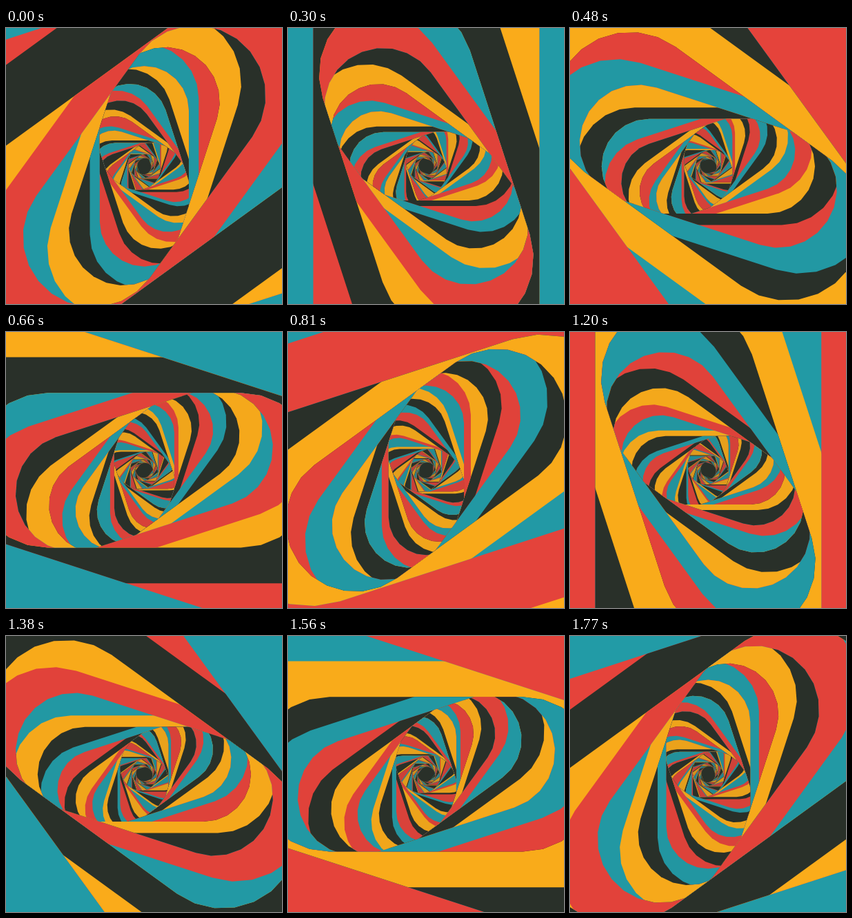
An HTML page with a canvas that plays this animation: 400 px wide and 400 px high, repeating every 1800 ms.

```html
<!DOCTYPE html>
<html lang="en">
<head>
<meta charset="utf-8">
<title>Twisting tunnel</title>
<style>
  html, body { margin: 0; width: 100%; height: 100%; overflow: hidden; background: #293029; }
  canvas { display: block; width: 400px; height: 400px; }
</style>
</head>
<body>
<canvas id="stage" width="400" height="400"></canvas>
<script>
const ctx = document.getElementById('stage').getContext('2d');

const LOOP = 1800, STEP = 30, PER_RING = 90;
const CENTER = 200.4, REACH = 600;
const FOCAL = 355;          // half width of the tunnel at depth 1
const STRETCH = 2.25;       // length to width of the cross-section
const SEGMENTS = 12;        // facets of each rounded end
const TWIST = -Math.PI / 10;
const DEPTH_SHIFT = 0.5;
const FAR = 36, FOG = 0.01;

const DARK = [41, 48, 41];
const COLORS = [DARK, [232, 67, 59], [255, 174, 26], [34, 156, 168]];

const angle = ring => TWIST * (ring - 9);

// Color of a ring, fading into the dark with depth
function shade(ring, depth) {
  const clear = Math.exp(-FOG * depth);
  const color = COLORS[(ring + 43) % 4];
  const mix = color.map((c, i) => Math.round(DARK[i] + (c - DARK[i]) * clear));
  return `rgb(${mix})`;
}

function turn(a) {
  ctx.setTransform(1, 0, 0, 1, CENTER, CENTER);
  ctx.rotate(a);
}

function stadium(ring, depth) {
  const b = FOCAL / depth, mid = b * (STRETCH - 1);
  turn(angle(ring));
  ctx.beginPath();
  for (const side of [1, -1]) {
    for (let i = 0; i <= SEGMENTS; i++) {
      const a = Math.PI * (i / SEGMENTS - 0.5);
      ctx.lineTo(side * (mid + b * Math.cos(a)), side * b * Math.sin(a));
    }
  }
  ctx.closePath();
}

// The step between two rings has a different color on each side
function face(ring, depth) {
  turn(angle(ring) + TWIST / 2);
  ctx.fillStyle = shade(ring + 2, depth);
  ctx.fillRect(-REACH, -REACH, 2 * REACH, 2 * REACH);
  ctx.fillStyle = shade(ring - 1, depth);
  ctx.fillRect(-REACH, -REACH, 2 * REACH, REACH);
}

function draw(time) {
  const travel = time / PER_RING - DEPTH_SHIFT;
  let ring = Math.floor(travel);
  let depth = ring + 1 - travel;

  ctx.save();
  turn(0);
  ctx.fillStyle = shade(ring, depth / 2);
  ctx.fillRect(-REACH, -REACH, 2 * REACH, 2 * REACH);

  for (; depth < FAR; ring++, depth++) {
    stadium(ring, depth);
    ctx.clip();
    face(ring, depth);
    stadium(ring + 1, depth);
    ctx.fillStyle = shade(ring + 1, depth + 0.5);
    ctx.fill();
  }

  stadium(ring, depth);
  ctx.fillStyle = `rgb(${DARK})`;
  ctx.fill();
  ctx.restore();
}

const start = performance.now();

function tick() {
  const time = (performance.now() - start) % LOOP;
  draw(Math.floor(time / STEP) * STEP);
  requestAnimationFrame(tick);
}
tick();
</script>
</body>
</html>
```
